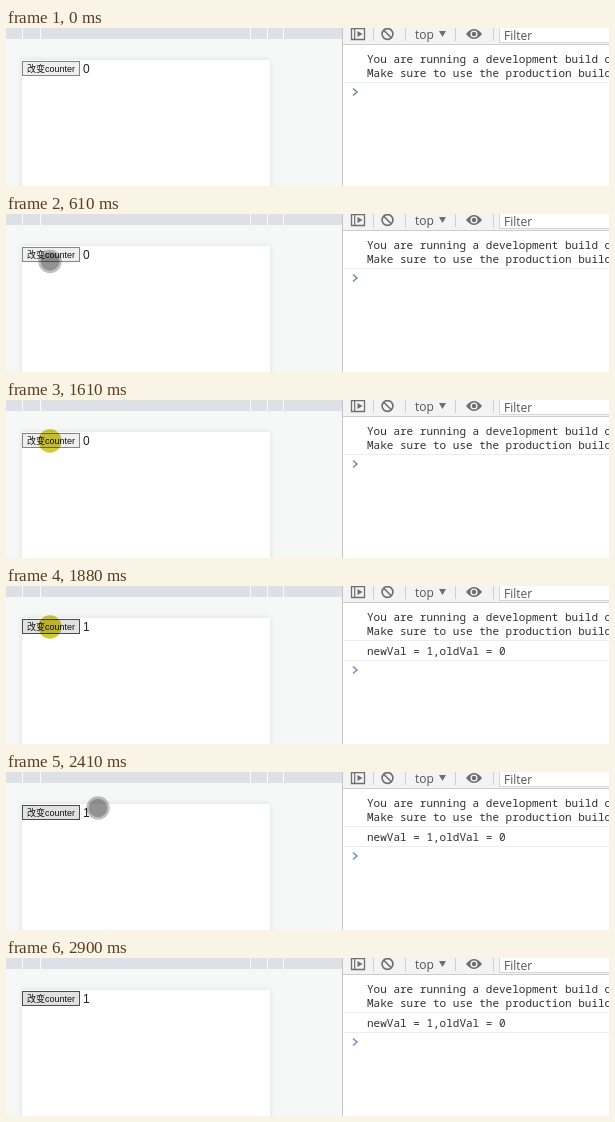
An HTML page with a canvas that plays this animation: 603 by 158 pixels, repeating every 3.38 s.

```html
<!DOCTYPE html>
<html lang="zh">
<head>
<meta charset="utf-8">
<title>Counter watcher</title>
<style>
html, body { margin: 0; width: 100%; height: 100%; overflow: hidden; background: #fff; }
canvas { display: block; width: 603px; height: 158px; }
</style>
</head>
<body>
<canvas id="stage" width="603" height="158"></canvas>
<script>
const ctx = document.getElementById('stage').getContext('2d');
const LOOP = 3380;
const SANS = '"Noto Sans CJK SC", "Noto Sans CJK", sans-serif';
const MONO = '11px "Noto Sans Mono", monospace';

// Pointer stops: time, x, y
const path = [
  [200, 262, 119], [270, 78, 62], [340, 51, 56], [410, 45, 52],
  [480, 43.5, 49], [550, 44, 47.5], [690, 44.5, 46.5], [750, 44.5, 43],
  [950, 44.5, 41.5], [1610, 44, 41], [1940, 45, 41], [2270, 46, 41],
  [2340, 54, 38], [2410, 92, 36], [2480, 165, 37], [2550, 247, 45],
  [2620, 331, 63], [2690, 413, 92], [2760, 483, 120], [2830, 527, 141]
];
const PRESS = 1610, FOCUS = 1810, UPDATE = 1880, RELEASE = 1940, LEAVE = 2900;

function rect(x, y, w, h, color) {
  ctx.fillStyle = color;
  ctx.fillRect(x, y, w, h);
}

function text(str, x, y, font, color) {
  ctx.font = font;
  ctx.fillStyle = color;
  ctx.fillText(str, x, y);
}

function disc(x, y, r, color) {
  ctx.fillStyle = color;
  ctx.beginPath();
  ctx.arc(x, y, r, 0, Math.PI * 2);
  ctx.fill();
}

function line(points, color, width, close) {
  ctx.strokeStyle = color;
  ctx.lineWidth = width;
  ctx.beginPath();
  points.forEach(([x, y]) => ctx.lineTo(x, y));
  if (close) ctx.closePath();
  ctx.stroke();
}

function triangle(a, b, c, color) {
  ctx.fillStyle = color;
  ctx.beginPath();
  [a, b, c].forEach(([x, y]) => ctx.lineTo(x, y));
  ctx.fill();
}

function page(focused, count) {
  rect(0, 0, 336, 158, '#f6f8f8');
  rect(0, 0, 336, 11, '#dde0e7');
  [16, 34, 244, 261, 277].forEach(x => rect(x, 0, 1, 11, '#fafbfc'));

  ctx.save();
  ctx.shadowColor = 'rgba(0,0,0,.1)';
  ctx.shadowBlur = 6;
  rect(16, 32, 248, 140, '#fff');
  ctx.restore();

  rect(16, 33, 58, 15, focused ? '#4c4c4c' : '#858585');
  rect(17, 34, 56, 13, focused ? '#e1e1e1' : '#efefef');
  text('改变', 21, 44, '9px ' + SANS, '#111');
  text('counter', 39, 44, '9px "Liberation Sans", Arial, sans-serif', '#111');
  text(count, 77, 45, '12px "Liberation Sans", Arial, sans-serif', '#222');
}

function toolbar() {
  const ink = '#6e6e6e';
  rect(337, 0, 266, 16, '#f3f3f3');
  rect(337, 16, 266, 1, '#cdcdcd');
  [367, 399, 449, 487].forEach(x => rect(x, 0, 1, 13, '#cfcfcf'));

  line([[345.5, 0.5], [358.5, 0.5], [358.5, 11.5], [345.5, 11.5]], ink, 1.3, true);
  line([[348.7, 0], [348.7, 12]], ink, 1.2);
  triangle([351.5, 3], [356.5, 6], [351.5, 9], ink);

  ctx.strokeStyle = ink;
  ctx.lineWidth = 1.6;
  ctx.beginPath();
  ctx.arc(381.5, 6, 5.4, 0, Math.PI * 2);
  ctx.stroke();
  line([[377.7, 2.2], [385.3, 9.8]], ink, 1.6);

  text('top', 409, 11, '12px "Open Sans", "Noto Sans", sans-serif', '#555');
  triangle([433, 3], [440, 3], [436.5, 9], ink);

  ctx.fillStyle = ink;
  ctx.beginPath();
  ctx.moveTo(460, 6);
  ctx.quadraticCurveTo(468, -4, 476, 6);
  ctx.quadraticCurveTo(468, 16, 460, 6);
  ctx.fill();
  disc(468, 6, 3.6, '#f3f3f3');
  disc(468, 6, 2.2, ink);

  rect(493, 0, 110, 15, '#d6d6d6');
  rect(494, 0, 109, 14, '#fff');
  text('Filter', 498, 12, '12px "Open Sans", "Noto Sans", sans-serif', '#555');
}

function devtools(logged) {
  rect(336, 0, 267, 158, '#fff');
  rect(336, 0, 1, 158, '#c6c6c6');
  toolbar();
  text('You are running a development build of Vue.', 361, 35, MONO, '#303030');
  text('Make sure to use the production build', 361, 49, MONO, '#303030');
  rect(337, 54, 266, 1, '#ececec');
  if (logged) {
    text('newVal = 1,oldVal = 0', 361, 69, MONO, '#303030');
    rect(337, 74, 266, 1, '#ececec');
  }
  const y = logged ? 84 : 64;
  line([[347, y - 3.5], [351, y], [347, y + 3.5]], logged ? '#6f8fb5' : '#7c858f', 1.5);
}

function pointer(t) {
  if (t < path[0][0] || t >= LEAVE) return;
  const [, x, y] = path.filter(p => p[0] <= t).pop();
  ctx.save();
  ctx.globalCompositeOperation = 'multiply';
  if (t >= PRESS && t < RELEASE) {
    disc(x, y, 11.7, '#d2ca34');
  } else {
    disc(x, y, 11.7, '#c0c0c0');
    disc(x, y, 9.3, '#c2c2c2');
  }
  ctx.restore();
}

function draw(now) {
  const t = (now - start) % LOOP;
  const done = t >= UPDATE;
  page(t >= FOCUS, done ? '1' : '0');
  devtools(done);
  pointer(t);
  requestAnimationFrame(draw);
}

const start = performance.now();
requestAnimationFrame(now => draw(Math.max(now, start)));
</script>
</body>
</html>
```
